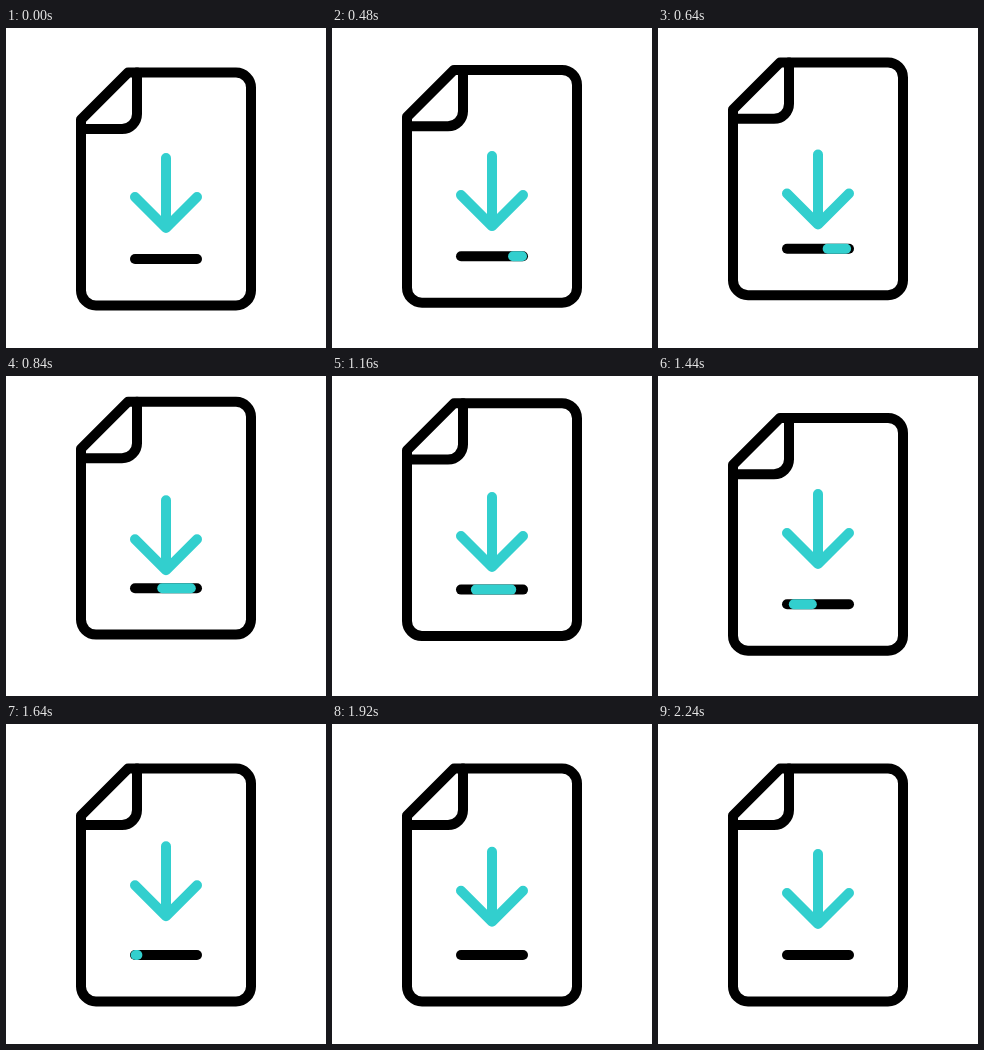
These frames come from a looping animation (320x320 px, 2480 ms). An HTML page with a canvas:

```html
<!DOCTYPE html>
<html lang="en">
<head>
<meta charset="utf-8">
<title>Download file</title>
<style>
html, body { margin: 0; width: 100%; height: 100%; overflow: hidden; background: #fff; }
canvas { display: block; width: 320px; height: 320px; }
</style>
</head>
<body>
<canvas id="stage"></canvas>
<script>
const LOOP = 2480, STEP = 40, SIZE = 320;
const INK = '#000', TEAL = '#32cfce';
const canvas = document.getElementById('stage');
const ctx = canvas.getContext('2d');
const scale = window.devicePixelRatio || 1;
canvas.width = canvas.height = SIZE * scale;

// [time, value] pairs, joined by a monotone cubic curve
const sheetLift = [[300, 0], [480, 2.7], [840, 18.8], [960, 19.4], [1160, 17.4], [1400, 4.3], [1440, 2.7], [1600, 0]];
const dashHead = [[300, 0], [480, .16], [840, .56], [1160, .76], [1440, .89], [1700, 1]];
const dashTail = [[300, 0], [480, .016], [840, .1], [1160, .19], [1440, .6], [1700, 1]];

function curve(keys, t) {
  const last = keys.length - 1;
  if (t <= keys[0][0]) return keys[0][1];
  if (t >= keys[last][0]) return keys[last][1];
  const slope = i => (keys[i + 1][1] - keys[i][1]) / (keys[i + 1][0] - keys[i][0]);
  const tangent = i => {
    if (i === 0 || i === last) return 0;
    const a = slope(i - 1), b = slope(i);
    return a * b <= 0 ? 0 : 2 * a * b / (a + b);
  };
  let i = 0;
  while (t > keys[i + 1][0]) i++;
  const [t0, v0] = keys[i], [t1, v1] = keys[i + 1];
  const d = t1 - t0, u = (t - t0) / d, w = 1 - u;
  return v0 * (1 + 2 * u) * w * w + v1 * u * u * (3 - 2 * u)
    + d * u * w * (tangent(i) * w - tangent(i + 1) * u);
}

// Steady climb, then a decelerating return
function arrowLift(t) {
  const start = 300, peak = 1480, end = 2240, top = 12.4;
  if (t <= start || t >= end) return 0;
  if (t < peak) return top * (t - start) / (peak - start);
  return top * ((end - t) / (end - peak)) ** 2;
}

function stroke(color, trace) {
  ctx.beginPath();
  trace();
  ctx.strokeStyle = color;
  ctx.stroke();
}

function line(...points) {
  points.forEach(([x, y], i) => i ? ctx.lineTo(x, y) : ctx.moveTo(x, y));
}

function sheet() {
  const l = 75, r = 245, t = 44.6, b = 277.4, rad = 15;
  stroke(INK, () => {
    ctx.moveTo(l, 91.6);
    ctx.lineTo(122, t);
    ctx.arcTo(r, t, r, b, rad);
    ctx.arcTo(r, b, l, b, rad);
    ctx.arcTo(l, b, l, t, rad);
    ctx.closePath();
  });
  stroke(INK, () => {
    ctx.moveTo(131, t);
    ctx.arcTo(131, 101, l, 101, rad);
    ctx.lineTo(l, 101);
  });
}

function progress(t) {
  const left = 129, right = 191, y = 231;
  const at = k => right - (right - left) * k;
  stroke(INK, () => line([left, y], [right, y]));
  const head = curve(dashHead, t), tail = curve(dashTail, t);
  if (head - tail > .005) stroke(TEAL, () => line([at(head), y], [at(tail), y]));
}

function arrow() {
  stroke(TEAL, () => {
    line([160, 130], [160, 200]);
    line([129, 169], [160, 200], [191, 169]);
  });
}

function shifted(lift, paint) {
  ctx.save();
  ctx.translate(0, -lift);
  paint();
  ctx.restore();
}

function draw(t) {
  ctx.setTransform(scale, 0, 0, scale, 0, 0);
  ctx.fillStyle = '#fff';
  ctx.fillRect(0, 0, SIZE, SIZE);
  ctx.lineWidth = 10;
  ctx.lineCap = ctx.lineJoin = 'round';
  shifted(curve(sheetLift, t), () => { sheet(); progress(t); });
  shifted(arrowLift(t), arrow);
}

const begin = performance.now();
function tick() {
  const t = (performance.now() - begin) % LOOP;
  draw(Math.floor(t / STEP) * STEP);
  requestAnimationFrame(tick);
}
tick();
</script>
</body>
</html>
```
